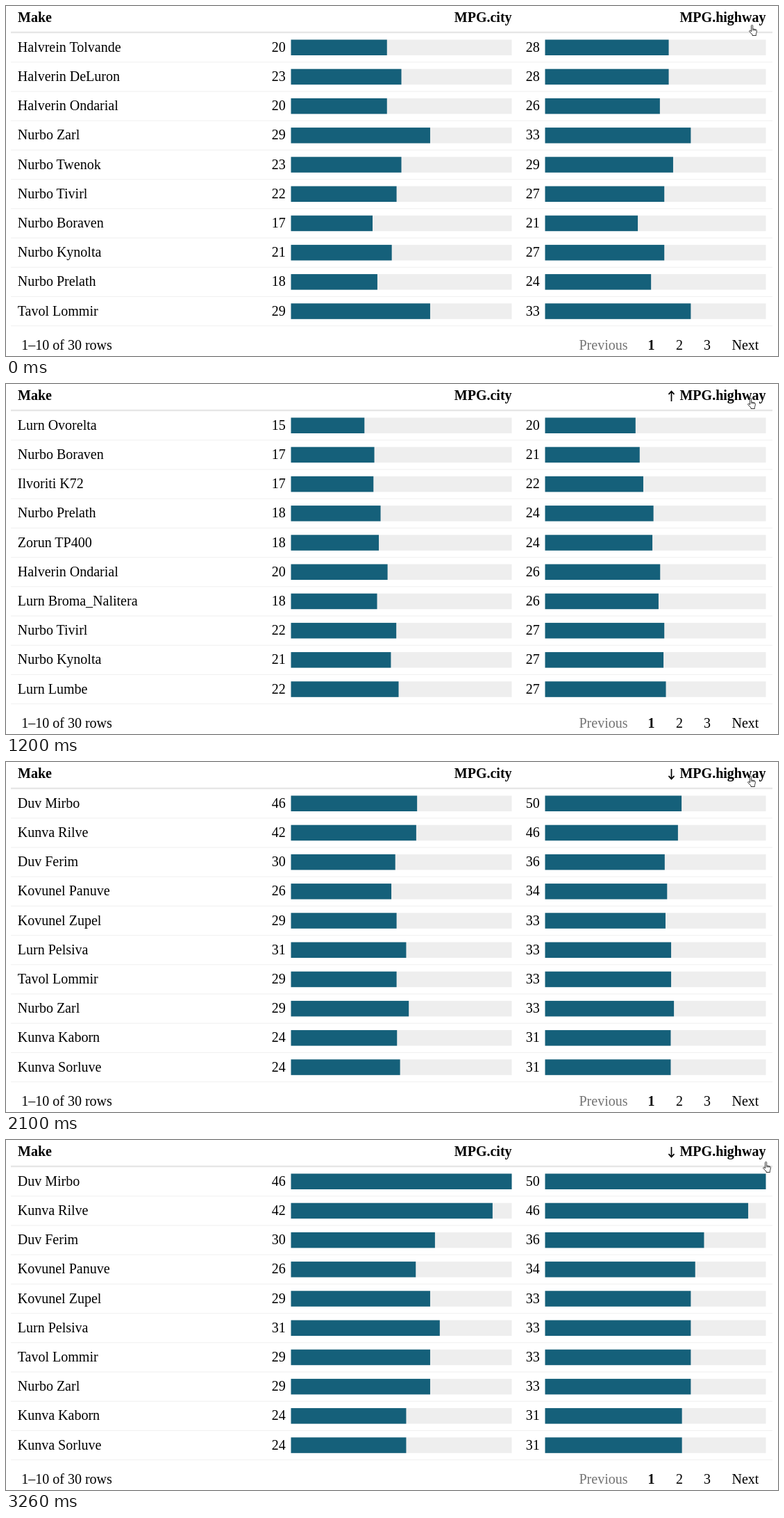
Recreate the animation shown at these times as an HTML page. Size 1112 by 504 pixels, loop 3.33 s.

```html
<!DOCTYPE html>
<html lang="en">
<head>
<meta charset="utf-8">
<title>Sortable table</title>
<style>
  html, body { margin: 0; width: 100%; height: 100%; overflow: hidden; background: #fff; }
  svg { display: block; font: 20px "Liberation Serif", "Times New Roman", serif; }
  .b { font-weight: bold; }
  .end { text-anchor: end; }
  .mid { text-anchor: middle; }
</style>
</head>
<body>
<svg id="stage" width="1112" height="504" viewBox="0 0 1112 504"></svg>
<script>
const LOOP = 3330, PITCH = 42.2, BAR = 318;
const COLUMNS = [{ x: 410.5, max: 46 }, { x: 776.5, max: 50 }];

const parse = s => s.split(",").map(r => {
  const [name, ...values] = r.split(":");
  return { name, values };
});
const unsorted = parse("Halvrein Tolvande:20:28,Halverin DeLuron:23:28,Halverin Ondarial:20:26,Nurbo Zarl:29:33,Nurbo Twenok:23:29,Nurbo Tivirl:22:27,Nurbo Boraven:17:21,Nurbo Kynolta:21:27,Nurbo Prelath:18:24,Tavol Lommir:29:33");
const ascending = parse("Lurn Ovorelta:15:20,Nurbo Boraven:17:21,Ilvoriti K72:17:22,Nurbo Prelath:18:24,Zorun TP400:18:24,Halverin Ondarial:20:26,Lurn Broma_Nalitera:18:26,Nurbo Tivirl:22:27,Nurbo Kynolta:21:27,Lurn Lumbe:22:27");
const descending = parse("Duv Mirbo:46:50,Kunva Rilve:42:46,Duv Ferim:30:36,Kovunel Panuve:26:34,Kovunel Zupel:29:33,Lurn Pelsiva:31:33,Tavol Lommir:29:33,Nurbo Zarl:29:33,Kunva Kaborn:24:31,Kunva Sorluve:24:31");

const stage = document.getElementById("stage");
function add(tag, attrs, content = "") {
  const el = document.createElementNS("http://www.w3.org/2000/svg", tag);
  for (const key in attrs) el.setAttribute(key, attrs[key]);
  el.textContent = content;
  return stage.appendChild(el);
}
const text = (x, y, content, cls = "", fill = "#000") => add("text", { x, y, class: cls, fill }, content);
const rect = (x, y, width, height, fill) => add("rect", { x, y, width, height, fill });

text(17, 23, "Make", "b");
text(728.6, 23, "MPG.city", "b end");
text(1094.4, 23, "MPG.highway", "b end");
const arrow = add("path", { d: "M0 7.5V-7M-4-2.6L0-7L4-2.6", fill: "none", stroke: "#000", "stroke-width": 1.7 });
rect(7, 36.8, 1097, 2.4, "#e6e6e6");

const rows = unsorted.map((_, i) => {
  const shift = PITCH * i, top = 48.5 + shift, base = Math.round(65.7 + shift);
  rect(7, 80.2 + shift, 1097, 1.2, "#f2f2f2");
  return {
    name: text(16.8, base, ""),
    cells: COLUMNS.map(({ x }) => {
      rect(x, top, BAR, 22.5, "#eee");
      return { value: text(x - 7.8, base, "", "end"), bar: rect(x, top, 0, 22.5, "#15607a") };
    })
  };
});

text(22.3, 495, "1–10 of 30 rows");
text(825.5, 495, "Previous", "", "#737373");
text(929.5, 495, "1", "b mid");
text(970, 495, "2", "mid");
text(1010, 495, "3", "mid");
text(1045.5, 495, "Next");

const hand = add("path", {
  d: "M3.5 10V1.6a1.1 1.1 0 0 1 2.2 0V6l4.2.9a1.8 1.8 0 0 1 1.5 1.8c0 2-.6 3.5-1 4.8v2H5V14L.9 10a1 1 0 0 1 1.5-1.4zM5.7 6v2.5M7.6 6.5v2M9.4 7v1.7",
  fill: "#fff", stroke: "#222", "stroke-width": .9, "stroke-linejoin": "round"
});

// CSS "ease": cubic-bezier(.25, .1, .25, 1)
function ease(x) {
  if (x <= 0) return 0;
  if (x >= 1) return 1;
  const curve = (a, b, u) => 3 * a * u * (1 - u) ** 2 + 3 * b * u * u * (1 - u) + u ** 3;
  let lo = 0, hi = 1;
  for (let i = 0; i < 24; i++) {
    const u = (lo + hi) / 2;
    if (curve(.25, .25, u) < x) lo = u; else hi = u;
  }
  return curve(.1, 1, lo);
}

// The one-second bar transition advances in 15 steps
const progress = (t, start, step) => ease(.03 + Math.floor((t - start) / step) / 15);

function handPosition(t) {
  if (t < 60) return [1070, 27];
  if (t < 130) return [1069, 23];
  if (t < 3260) return [1068, 20];
  return [1090, 31];
}

function draw(t) {
  let from = unsorted, to = unsorted, p = 1, flip = 0;
  if (t >= 1900) {
    [from, to, flip] = [ascending, descending, -1];
    p = progress(t, 1892, 68.6);
  } else if (t >= 540) {
    [from, to, flip] = [unsorted, ascending, 1];
    p = progress(t, 524, 67.5);
  }
  arrow.setAttribute("visibility", flip ? "visible" : "hidden");
  arrow.setAttribute("transform", `translate(958.5 17.5) scale(1 ${flip})`);
  rows.forEach(({ name, cells }, i) => {
    name.textContent = to[i].name;
    cells.forEach(({ value, bar }, c) => {
      const a = +from[i].values[c], b = +to[i].values[c];
      value.textContent = b;
      bar.setAttribute("width", (a + (b - a) * p) / COLUMNS[c].max * BAR);
    });
  });
  hand.setAttribute("transform", `translate(${handPosition(t)})`);
}

const began = performance.now();
function tick() {
  draw((performance.now() - began) % LOOP);
  requestAnimationFrame(tick);
}
tick();
</script>
</body>
</html>
```
